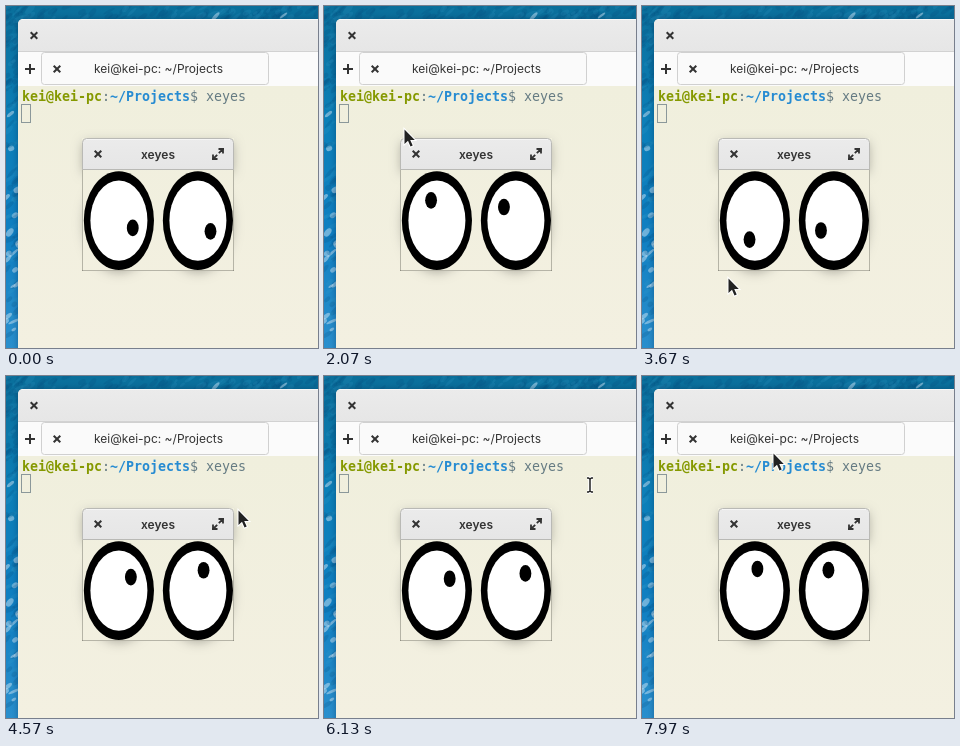
Write an HTML page with a canvas that moves like this. It is 312 by 342 pixels and loops after 8 s.

```html
<!DOCTYPE html>
<html lang="en">
<head>
<meta charset="utf-8">
<title>xeyes</title>
<style>
html, body { margin: 0; width: 100%; height: 100%; overflow: hidden; }
canvas { display: block; }
</style>
</head>
<body>
<canvas id="stage" width="312" height="342"></canvas>
<script>
const W = 312, H = 342, LOOP = 8000, STEP = 100 / 3, LAG = 20;
const UI = 'Inter, "Open Sans", sans-serif';
const MONO = '"Roboto Mono", "DejaVu Sans Mono", monospace';
const USER = 'kei', HOST = 'kei-pc';
const EYES = [112.9, 191.9], EYE_Y = 214.6, UX = 39.5, UY = 55.6;

// The pointer circles the eyes: time, turns, distance from the hub.
const HUB = [150, 185], CUT = 5460;
const CLOCKWISE = [
  [434, 0.093, 222], [466, 0.17, 200], [1250, 0.25, 31], [1367, 0.25, 51],
  [1780, 0.484, 99], [2360, 0.75, 82], [2767, 0.99, 93], [3420, 1.266, 98],
  [3800, 1.41, 112], [4310, 1.75, 97], [4567, 1.912, 97], [4760, 2.04, 124],
  [4960, 2.172, 154], [5230, 2.42, 60], [5433, 2.669, 104]
];
const COUNTER = [
  [5600, 0.159, 116], [5860, 0.057, 128], [6133, -0.092, 139], [6400, -0.25, 121],
  [6780, -0.47, 106], [7150, -0.735, 104], [7267, -0.866, 126], [7480, -1.01, 136],
  [7720, -1.165, 133], [7967, -1.278, 110]
];

// Hermite curve through timed keys, clamped at both ends.
function along(keys, t) {
  const last = keys.length - 1;
  t = Math.min(Math.max(t, keys[0][0]), keys[last][0]);
  let i = 0;
  while (i < last - 1 && keys[i + 1][0] < t) i++;
  const a = keys[i], b = keys[i + 1], d = b[0] - a[0], u = (t - a[0]) / d;
  const slope = (k, c) => {
    const p = keys[Math.max(0, k - 1)], q = keys[Math.min(last, k + 1)];
    return (q[c] - p[c]) / (q[0] - p[0]) * d;
  };
  const u2 = u * u, u3 = u2 * u;
  return [1, 2].map(c =>
    (2 * u3 - 3 * u2 + 1) * a[c] + (u3 - 2 * u2 + u) * slope(i, c) +
    (3 * u2 - 2 * u3) * b[c] + (u3 - u2) * slope(i + 1, c));
}

function pointerAt(t, lag = 0) {
  const [turn, r] = along(t < CUT ? CLOCKWISE : COUNTER, t - lag);
  const a = turn * Math.PI * 2;
  return [HUB[0] + r * Math.cos(a), HUB[1] + r * Math.sin(a)];
}

function text(c, str, x, y, font, color, align = 'left') {
  c.font = font;
  c.fillStyle = color;
  c.textAlign = align;
  c.fillText(str, x, y);
}

function lines(c, color, width, ...segs) {
  c.strokeStyle = color;
  c.lineWidth = width;
  c.beginPath();
  for (const [x1, y1, x2, y2] of segs) {
    c.moveTo(x1, y1);
    c.lineTo(x2, y2);
  }
  c.stroke();
}

function cross(c, x, y) {
  lines(c, '#333', 2, [x - 3.3, y - 3.3, x + 3.3, y + 3.3], [x - 3.3, y + 3.3, x + 3.3, y - 3.3]);
}

function box(c, x, y, w, h, r) {
  c.beginPath();
  c.roundRect(x, y, w, h, r);
}

function ellipse(c, x, y, r, color) {
  c.fillStyle = color;
  c.beginPath();
  c.ellipse(x, y, r * UX, r * UY, 0, 0, Math.PI * 2);
  c.fill();
}

function fade(c, y1, y2, ...colors) {
  const g = c.createLinearGradient(0, y1, 0, y2);
  colors.forEach((color, i) => g.addColorStop(i / (colors.length - 1), color));
  return g;
}

// Sea with foam that thickens towards the bottom.
function wallpaper(c) {
  c.fillStyle = fade(c, 0, H, '#0a6f9b', '#0c7fb8', '#0f7fc2', '#2a8fcd');
  c.fillRect(0, 0, W, H);
  let seed = 7;
  const rnd = () => (seed = seed * 16807 % 2147483647) / 2147483647;
  for (let i = 0; i < 200; i++) {
    const top = i % 2, x = rnd() * (top ? W : 13), y = rnd() * (top ? 13 : H);
    const foam = rnd() < Math.pow(y / H, 2) * 0.7;
    c.fillStyle = foam ? 'rgba(190,220,240,.55)' : i % 3 ? 'rgba(3,75,125,.2)' : 'rgba(50,155,200,.2)';
    c.beginPath();
    c.ellipse(x, y, 2 + rnd() * 5, 1 + rnd() * 2, -0.9 + rnd() * 0.5, 0, 7);
    c.fill();
  }
}

function terminal(c) {
  c.save();
  c.shadowColor = 'rgba(0,20,50,.35)';
  c.shadowBlur = 7;
  c.fillStyle = fade(c, 80, H, '#f0efdd', '#f3f0e1');
  box(c, 12, 13, W, H, [5, 0, 0, 0]);
  c.fill();
  c.restore();

  c.fillStyle = fade(c, 13, 46, '#ebebeb', '#e6e6e6');
  box(c, 12, 13, W, 33, [5, 0, 0, 0]);
  c.fill();
  lines(c, '#f8f8f8', 1, [16, 13.5, W, 13.5]);
  c.fillStyle = '#fbfbfb';
  c.fillRect(12, 46, W, 34);
  lines(c, '#d2d2d2', 1, [12, 45.5, W, 45.5]);
  box(c, 35.5, 46.5, 227, 32, 3);
  c.fillStyle = '#fafafa';
  c.fill();
  c.strokeStyle = '#d0d0d0';
  c.stroke();

  cross(c, 28, 29.5);
  cross(c, 51, 63);
  lines(c, '#333', 2, [19, 63, 29, 63], [24, 58, 24, 68]);
  text(c, `${USER}@${HOST}: ~/Projects`, 152.5, 67, '12px ' + UI, '#333', 'center');

  const parts = [
    [`${USER}@${HOST}`, '#859900', 700], [':', '#657b83', 400],
    ['~/Projects', '#268bd2', 700], ['$ xeyes', '#657b83', 400]
  ];
  let x = 16;
  for (const [str, color, weight] of parts) {
    text(c, str, x, 95, `${weight} 13.3px ${MONO}`, color);
    x += str.length * 8;
  }
  c.strokeStyle = '#8b989a';
  c.lineWidth = 1;
  c.strokeRect(15.5, 98.5, 9, 18);
}

function eyesWindow(c) {
  // The shadow only falls outside the window.
  c.save();
  c.beginPath();
  c.rect(0, 0, W, H);
  c.rect(76, 132, 152, 133);
  c.clip('evenodd');
  c.shadowColor = 'rgba(0,0,0,.28)';
  c.shadowBlur = 11;
  c.shadowOffsetY = 3;
  c.fillStyle = '#e8e8e8';
  box(c, 77, 133, 150, 31, [4, 4, 0, 0]);
  c.fill();
  for (const x of EYES) ellipse(c, x, EYE_Y, 0.88, '#000');
  c.restore();

  lines(c, 'rgba(90,90,80,.4)', 1, [76.5, 163, 76.5, 265], [227.5, 163, 227.5, 265], [76, 264.5, 228, 264.5]);
  c.fillStyle = fade(c, 132, 163, '#ebebeb', '#e6e6e6');
  box(c, 76.5, 132.5, 151, 31, [4, 4, 0, 0]);
  c.fill();
  c.strokeStyle = '#b9b9b5';
  c.stroke();
  lines(c, '#f6f6f6', 1, [80, 133.5, 224, 133.5]);

  cross(c, 92, 148);
  text(c, 'xeyes', 152, 153, '600 12px ' + UI, '#333', 'center');
  lines(c, '#333', 1.8, [212.8, 147.2, 217, 143], [211.2, 148.8, 207, 153],
    [212.5, 143, 218, 143], [217, 142.5, 217, 147.5],
    [206, 153, 211.5, 153], [207, 148.5, 207, 153.5]);

  for (const x of EYES) {
    ellipse(c, x, EYE_Y, 0.888, '#000');
    ellipse(c, x, EYE_Y, 0.722, '#fff');
  }
}

function pupils(c, [px, py]) {
  for (const x of EYES) {
    const dx = px - x, dy = py - EYE_Y, a = Math.atan2(dy, dx);
    let ox = Math.cos(a) * 0.38 * UX, oy = Math.sin(a) * 0.38 * UY;
    if (Math.hypot(ox, oy) > Math.hypot(dx, dy)) [ox, oy] = [dx, dy];
    ellipse(c, x + ox, EYE_Y + oy - 0.8, 0.15, '#000');
  }
}

const arrow = new Path2D('M0.5 0.5V15L4 11.8L6.5 17.6L8.7 16.6L6.2 11H10.8Z');
const beam = new Path2D('M-3 -7H-1.5L0 -6L1.5 -7H3M0 -6V6M-3 7H-1.5L0 6L1.5 7H3');

function pointer(c, [x, y]) {
  const overEyes = x > 67 && x < 238 && y > 121 && y < 275;
  const onArrow = y < 80 || overEyes;
  const shape = onArrow ? arrow : beam;
  c.save();
  c.translate(Math.round(x), Math.round(y));
  c.lineWidth = onArrow ? 2 : 3.6;
  c.strokeStyle = '#fff';
  c.stroke(shape);
  c.lineWidth = 1.5;
  c.fillStyle = c.strokeStyle = '#222';
  if (onArrow) c.fill(shape);
  else c.stroke(shape);
  c.restore();
}

const ctx = document.getElementById('stage').getContext('2d');
const scene = document.createElement('canvas');
scene.width = W;
scene.height = H;
const sc = scene.getContext('2d');
wallpaper(sc);
terminal(sc);
eyesWindow(sc);

function draw(now) {
  const t = Math.floor((now % LOOP) / STEP + 0.15) * STEP;
  ctx.drawImage(scene, 0, 0);
  pupils(ctx, pointerAt(t, LAG));
  pointer(ctx, pointerAt(t));
}

const start = performance.now();
function tick() {
  draw(performance.now() - start);
  requestAnimationFrame(tick);
}
tick();
</script>
</body>
</html>
```
